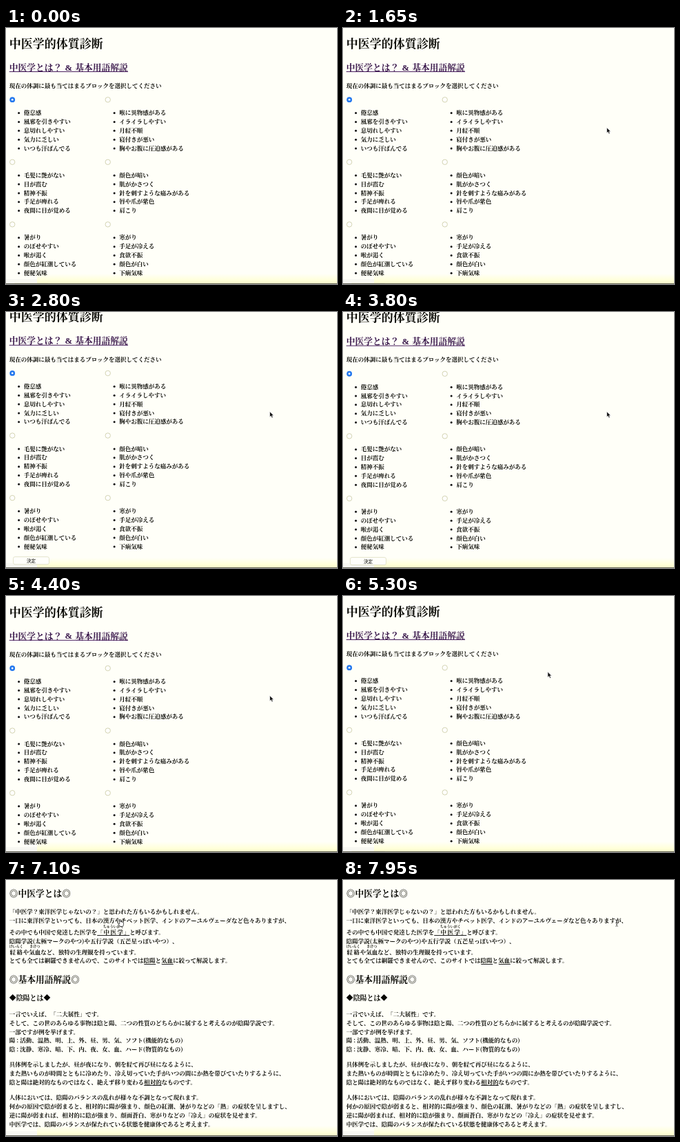
Animation of 480x372 px, one loop 8 s. Source, as an HTML page:

```html
<!DOCTYPE html>
<html lang="ja">
<head>
<meta charset="utf-8">
<title>体質診断</title>
<style>
html, body { margin: 0; width: 100%; height: 100%; overflow: hidden; background: #fffff8; }
svg { display: block; width: 480px; height: 372px; }
text {
  font-family: "Noto Serif CJK JP", "Noto Sans CJK JP", "Noto Sans CJK", serif;
  font-weight: 600;
  text-spacing-trim: space-all;
  white-space: pre;
  fill: #080804;
}
.b { font-weight: 900; }
.link { fill: #38164a; font-weight: 700; }
.amp { font-family: "Liberation Serif", serif; }
.btn { font-family: "Noto Sans CJK JP", "Noto Sans CJK", sans-serif; font-weight: 400; }
</style>
</head>
<body>
<svg id="stage" viewBox="0 0 480 372">
  <defs>
    <linearGradient id="fade" x2="0" y2="1">
      <stop stop-color="#fffff8"/>
      <stop offset="1" stop-color="#ffffcc"/>
    </linearGradient>
  </defs>
  <rect width="480" height="372" fill="#fffff8"/>
  <rect x="45" y="357" width="435" height="14" fill="url(#fade)"/>
  <rect y="365" width="45" height="6" fill="#f8f8f2"/>
  <g id="quiz"></g>
  <g id="guide"></g>
  <rect y="371" width="480" height="1" fill="#66665a"/>
  <g id="arrow"><path d="M0 0V7.8L1.8 6.2L3.2 9.1L4.6 8.4L3.3 5.6H5.7Z" fill="#111" stroke="#fff" stroke-width=".6"/></g>
  <g id="hand"><path d="M-.8 .4Q0-.6 .8 .4V3.4Q2-.1 2.2 3.7Q3.5 2.8 3.7 4.2Q5 3.6 5 5V7Q4.8 8.6 4 10H0Q-1.2 8-2.8 6.2Q-2.6 4.9-.8 6.2Z" fill="#fff" stroke="#222" stroke-width=".8"/></g>
  <g id="beam"><path d="M-1.8-4.5Q0-4.5 0-3.3Q0-4.5 1.8-4.5M0-3.3V3.7M-1.8 4.8Q0 4.8 0 3.7Q0 4.8 1.8 4.8M-1 1.8H1" fill="none" stroke="#444" stroke-width=".8"/></g>
</svg>
<script>
const NS = 'http://www.w3.org/2000/svg';
const $ = id => document.getElementById(id);
const quiz = $('quiz'), guide = $('guide');
const EM = 8.5, H1 = 17, H2 = 12.75, H3 = 9.95, ROW = 12.85, LEFT = 4.7;

function add(parent, tag, attrs, str) {
  const el = document.createElementNS(NS, tag);
  for (const k in attrs) el.setAttribute(k, attrs[k]);
  if (str) el.textContent = str;
  parent.appendChild(el);
}
// y is the vertical middle of the characters
function write(parent, x, y, str, size = EM, cls = '', more = {}) {
  add(parent, 'text', { x, y: y + size * .38, 'font-size': size, class: cls, ...more }, str);
}
function rule(parent, x, y, width, fill = '#222') {
  add(parent, 'rect', { x, y, width, height: 1, fill });
}

function radio(x, y, on) {
  if (on) {
    add(quiz, 'circle', { cx: x, cy: y, r: 3.9, fill: '#2478ee' });
    add(quiz, 'circle', { cx: x, cy: y, r: 1.4, fill: '#fff' });
  } else {
    add(quiz, 'circle', { cx: x, cy: y, r: 3.7, fill: '#fffffc', stroke: '#c8c8a0', 'stroke-width': .8 });
  }
}

const blocks = [
  '倦怠感 風邪を引きやすい 息切れしやすい 気力に乏しい いつも汗ばんでる',
  '喉に異物感がある イライラしやすい 月経不順 寝付きが悪い 胸やお腹に圧迫感がある',
  '毛髪に艶がない 目が霞む 精神不振 手足が痺れる 夜間に目が覚める',
  '顔色が暗い 肌がかさつく 針を刺すような痛みがある 唇や爪が紫色 肩こり',
  '暑がり のぼせやすい 喉が渇く 顔色が紅潮している 便秘気味',
  '寒がり 手足が冷える 食欲不振 顔色が白い 下痢気味'
];

function buildQuiz() {
  write(quiz, LEFT, 22.3, '中医学的体質診断', H1, 'b');
  write(quiz, LEFT, 56.9, '中医学とは？', H2, 'link');
  write(quiz, 85.5, 56.7, '&', H2, 'link amp');
  write(quiz, 100.3, 56.9, '基本用語解説', H2, 'link');
  rule(quiz, LEFT, 63, 172.3, '#4a2060');
  write(quiz, LEFT, 83.6, '現在の体調に最も当てはまるブロックを選択してください');
  blocks.forEach((items, i) => {
    const x = i % 2 * 138.5, y = 104.2 + (i >> 1) * 90.6;
    radio(9.2 + x, y, i === 0);
    items.split(' ').forEach((item, n) => {
      const mid = y + 18.8 + n * ROW;
      add(quiz, 'circle', { cx: 18.6 + x, cy: mid + .6, r: 1.5, fill: '#111' });
      write(quiz, 25.8 + x, mid, item);
    });
  });
  add(quiz, 'rect', { x: 10.5, y: 371, width: 52, height: 11, rx: 2.5, fill: '#fffffa', stroke: '#dedec0', 'stroke-width': .8 });
  write(quiz, 36.5, 376.7, '決定', 6.6, 'btn', { 'text-anchor': 'middle' });
}

function ruby(x, y, base, kana, w) {
  const step = w / base.length;
  [...base].forEach((c, i) => write(guide, x + step * (i + .5) - EM / 2, y, c));
  write(guide, x + w / 2, y - 8, kana, 5, '', { 'text-anchor': 'middle' });
}

function buildGuide() {
  const line = (y, str, x = LEFT) => write(guide, x, y, str);
  const under = (x, y, w) => rule(guide, x, Math.round(y + 4), w);
  write(guide, LEFT, 19.2, '◎中医学とは◎', H2, 'b');
  line(45.7, '「中医学？東洋医学じゃないの？」と思われた方もいるかもしれません。');
  line(58.7, '一口に東洋医学といっても、日本の漢方やチベット医学、インドのアーユルヴェーダなど色々ありますが、');
  line(75.3, 'その中でも中国で発達した医学を「');
  ruby(140.7, 75.3, '中医学', 'ちゅういがく', 30);
  line(75.3, '」と呼びます。', 170.7);
  under(132.2, 75.6, 47);
  line(88.3, '陰陽学説(太極マークのやつ)や五行学説（五芒星っぽいやつ）、');
  ruby(LEFT, 104.3, '経絡', 'けいらく', 20);
  line(104.3, 'や', 24.7);
  ruby(33.2, 104.3, '気血', 'きけつ', 17);
  line(104.3, 'など、独特の生理観を持っています。', 50.2);
  line(117, 'とても全ては網羅できませんので、このサイトでは陰陽と気血に絞って解説します。');
  under(LEFT + 23 * EM, 117.5, 17);
  under(LEFT + 26 * EM, 117.5, 17);

  write(guide, LEFT, 144.2, '◎基本用語解説◎', H2, 'b');
  write(guide, LEFT, 171.3, '◆陰陽とは◆', H3, 'b');
  const para = (y, rows) => rows.forEach((s, i) => line(y + i * ROW, s));
  para(194.7, [
    '一言でいえば、「二大属性」です。',
    'そして、この世のあらゆる事物は陰と陽、二つの性質のどちらかに属すると考えるのが陰陽学説です。',
    '一部ですが例を挙げます。',
    '陽 : 活動、温熱、明、上、外、昼、男、気、ソフト(機能的なもの)',
    '陰 : 沈静、寒冷、暗、下、内、夜、女、血、ハード(物質的なもの)'
  ]);
  para(268.2, [
    '具体例を示しましたが、昼が夜になり、朝を経て再び昼になるように、',
    'また熱いものが時間とともに冷めたり、冷え切っていた手がいつの間にか熱を帯びていたりするように、',
    '陰と陽は絶対的なものではなく、絶えず移り変わる相対的なものです。'
  ]);
  under(LEFT + 23 * EM, 294.2, 3 * EM);
  para(316.2, [
    '人体においては、陰陽のバランスの乱れが様々な不調となって現れます。',
    '何かの原因で陰が弱まると、相対的に陽が強まり、顔色の紅潮、暑がりなどの「熱」の症状を呈しますし、',
    '逆に陽が弱まれば、相対的に陰が強まり、顔面蒼白、寒がりなどの「冷え」の症状を見せます。',
    '中医学では、陰陽のバランスが保たれている状態を健康体であると考えます。'
  ]);
}

const LOOP = 8000, OPEN = 6900;

// [time, value] keys joined by smooth steps
function track(t, keys) {
  if (t <= keys[0][0]) return keys[0][1];
  for (let i = 1; i < keys.length; i++) {
    const [a, v] = keys[i - 1], [b, w] = keys[i];
    if (t < b) {
      const p = (t - a) / (b - a);
      return v + (w - v) * p * p * (3 - 2 * p);
    }
  }
  return keys[keys.length - 1][1];
}
const scroll = [[1750, 0], [2100, -15.6], [2250, -15.6], [3250, -15], [3750, -15], [4200, .9], [4400, .8], [4650, 0]];
const curX = [[150, 484], [1000, 382.5], [4700, 382.5], [6100, 165.5], [7200, 165.5], [7900, 397]];
const curY = [[150, 250], [1000, 144.8], [4700, 144.8], [6100, 57.5], [7200, 57.5], [7900, 62.5]];

function show(id, on) { $(id).setAttribute('display', on ? 'inline' : 'none'); }

function draw(t) {
  const second = t >= OPEN;
  show('quiz', !second);
  show('guide', second);
  quiz.setAttribute('transform', `translate(0 ${track(t, scroll)})`);

  const x = track(t, curX), y = track(t, curY);
  const onLink = !second && y < 65 && x < 177;
  const kind = onLink || (second && t < 7200) ? 'hand' : second ? 'beam' : 'arrow';
  for (const id of ['arrow', 'hand', 'beam']) show(id, id === kind);
  $(kind).setAttribute('transform', `translate(${x} ${y})`);
}

buildQuiz();
buildGuide();
const start = performance.now();
function tick() {
  draw((performance.now() - start) % LOOP);
  requestAnimationFrame(tick);
}
tick();
</script>
</body>
</html>
```
